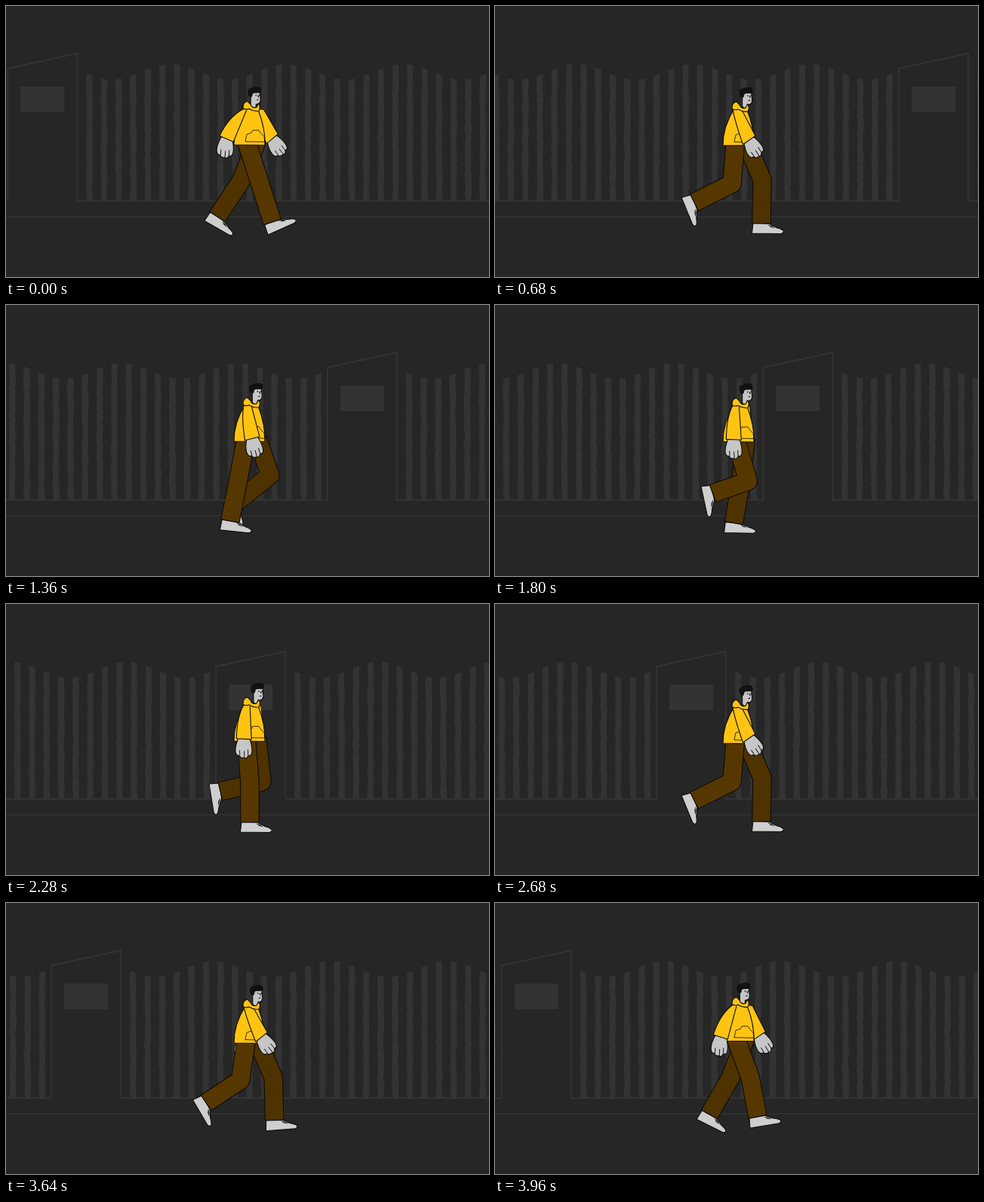
Animation, 640 px wide and 360 px high, one loop 4 s. Source, as an HTML page with a canvas:

```html
<!DOCTYPE html>
<html lang="en">
<head>
<meta charset="utf-8">
<title>Night walk</title>
<style>
  html, body { margin: 0; width: 100%; height: 100%; overflow: hidden; background: #262626; }
  canvas { display: block; }
</style>
</head>
<body>
<canvas id="stage" width="640" height="360"></canvas>
<script>
const ctx = document.getElementById('stage').getContext('2d');
const LOOP = 4000, STEP = 40, STRIDE = 1000;
const TILE = 641.6, SPACING = 19.3, BARS = 28;
const INK = '#0c0c0c', SKIN = '#c6c6c6', SHOE = '#cecece', HOODIE = '#ffc412', FENCE = '#333333';
const NEAR_PANTS = '#573700', FAR_PANTS = '#4e3200';
const FAR_OFFSET = 14;
const RAD = Math.PI / 180;

// phase, knee x, knee y, cuff x, cuff y, foot angle
const LEG = [
  [0, 337, 237, 353, 287, -25],
  [180, 347, 231, 353, 289, 0],
  [280, 323, 238, 323, 290, 0],
  [360, 307, 236, 297, 287, 5],
  [460, 305, 232, 284, 281, 26],
  [500, 304, 233, 280, 280, 29],
  [680, 314, 236, 264, 261, 67],
  [780, 332, 236, 284, 249, 80],
  [860, 343, 226, 305, 262, 55],
  [960, 338, 231, 348, 284, -10]
];
// phase, arm angle
const ARM = [[0, 36], [180, 20], [280, 5], [360, -10], [460, -24], [500, -28], [680, -25], [780, 0], [960, 27]];

const SHAPES = {
  foot: 'M-11 -1 L-12.5 13 L26 13.5 Q31 12 28.5 9 Q26 7 20 5.5 L10 0 Z',
  laces: 'M11 4 L17 5.5 M9 2 L15 4',
  hand: 'M-7 -2 Q-12 10 -11 17 Q-10 23 -6 22 Q-4 26 0 25 Q4 27 6 22 Q11 23 11 16 Q11 8 7 -2 Z',
  fingers: 'M-5 22 L-5.5 15 M1 25 L0.5 16 M6 22 L5.5 14',
  torso: 'M317 134 Q302 158 302 183 L343 183.5 Q344 162 334 136 Z',
  pocket: 'M317 178.5 L319 169 L325 167 L327 163.5 L335 163.5 L338 168 L342 172 L343 179 Z',
  hood: 'M314 134 Q314 126 320 125 L324 129 Q326 135 332 133 L334.5 128 Q338 133 335 138 Q328 139 322 135 Q317 137 314 134 Z',
  face: 'M324 116 L324 132 Q327 137 331 134 L331 130 Q337 130 337 124 L336 112 Z',
  hair: 'M322 120 Q318 110 324 109 Q329 106 336 107.5 Q339 111 337 114.5 Q331 115 327 114.5 L325.5 120 Z',
  features: 'M331 117 L331 119 M335.5 117 L335.5 119 M333.5 118 L334.5 121 M332 124.5 L334.5 124'
};
for (const name in SHAPES) SHAPES[name] = new Path2D(SHAPES[name]);

// Smooth periodic curve through the keys, one value per column
function sample(keys, phase) {
  const n = keys.length;
  const key = i => keys[(i + n) % n];
  const time = i => key(i)[0] + STRIDE * Math.floor(i / n);
  let i = n - 1;
  while (keys[i][0] > phase) i--;
  const span = time(i + 1) - time(i), u = (phase - time(i)) / span;
  return key(i).slice(1).map((_, c) => {
    const value = j => key(j)[c + 1];
    const slope = j => (value(j + 1) - value(j - 1)) / (time(j + 1) - time(j - 1)) * span;
    const a = value(i), b = value(i + 1), u2 = u * u, u3 = u2 * u;
    return a + (b - a) * (3 * u2 - 2 * u3) + slope(i) * (u3 - 2 * u2 + u) + slope(i + 1) * (u3 - u2);
  });
}

function paint(path, fill, line = 1.1) {
  if (fill) { ctx.fillStyle = fill; ctx.fill(path); }
  if (line) { ctx.strokeStyle = INK; ctx.lineWidth = line; ctx.stroke(path); }
}

function at(x, y, angle, draw) {
  ctx.save();
  ctx.translate(x, y);
  ctx.rotate(angle * RAD);
  draw();
  ctx.restore();
}

function makeFence() {
  let seed = 7;
  const rough = () => ((seed = seed * 16807 % 2147483647) / 2147483647 - 0.5) * 1.6;
  const top = x => 87.5 + 10.5 * Math.cos((x - 46) * 2 * Math.PI / (8 * SPACING));
  const path = new Path2D();
  for (let i = 0; i < BARS; i++) {
    const x = 16.3 + i * SPACING;
    path.moveTo(x - 4, top(x - 4));
    path.lineTo(x + 4, top(x + 4));
    for (let y = 102; y <= 258; y += 4) path.lineTo(x + 4 + rough(), y);
    for (let y = 258; y >= 102; y -= 4) path.lineTo(x - 4 + rough(), y);
    path.closePath();
  }
  path.rect(-75, 107, 58, 34);
  return path;
}
const fence = makeFence();
const outline = new Path2D(`M-92 259 V83 L0 63 V259 H${TILE - 92}`);

function drawStreet(t) {
  ctx.fillStyle = '#262626';
  ctx.fillRect(0, 0, 640, 360);
  ctx.fillStyle = ctx.strokeStyle = FENCE;
  ctx.lineWidth = 1.8;
  const x = 94.4 - TILE * t / LOOP;
  for (const shift of [0, TILE]) {
    at(x + shift, 0, 0, () => { ctx.fill(fence); ctx.stroke(outline); });
  }
  ctx.fillRect(0, 279.2, 640, 1.6);
}

function drawLeg(phase, offset, bob, color) {
  const [kneeX, kneeY, cuffX, cuffY, footAngle] = sample(LEG, phase);
  at(cuffX, cuffY, footAngle, () => {
    paint(SHAPES.foot, SHOE);
    paint(SHAPES.laces, null, 0.9);
  });
  const leg = new Path2D();
  leg.moveTo(318.5 + offset, 178 + bob);
  leg.lineTo(kneeX + offset / 2, kneeY);
  leg.lineTo(cuffX, cuffY);
  for (const [style, width] of [[INK, 25.6], [color, 23.4]]) {
    ctx.strokeStyle = style;
    ctx.lineWidth = width;
    ctx.stroke(leg);
  }
  const shin = Math.atan2(cuffY - kneeY, cuffX - kneeX - offset / 2) / RAD - 90;
  at(cuffX, cuffY, shin, () => {
    ctx.fillStyle = INK;
    ctx.fillRect(-12.8, -0.6, 25.6, 1.2);
  });
}

function drawArm(phase, offset, bob) {
  const [angle] = sample(ARM, phase);
  const x = 319 + offset, y = 138 + bob;
  const length = 42 + Math.max(0, angle) * 0.1;
  const cuffX = x - length * Math.sin(angle * RAD), cuffY = y + length * Math.cos(angle * RAD);
  const tilt = angle * (angle < 0 ? 1.4 : 0.65) * RAD;
  const dx = 10 * Math.cos(tilt), dy = 10 * Math.sin(tilt);
  at(cuffX, cuffY, angle * (angle < 0 ? 1.2 : 0.2), () => {
    paint(SHAPES.hand, SKIN);
    paint(SHAPES.fingers, null, 0.9);
  });
  const left = cuffX - dx, leftY = cuffY - dy;
  const sleeve = new Path2D();
  sleeve.moveTo(x - 4, y - 3);
  sleeve.quadraticCurveTo((x - 4 + left) / 2 - 4, (y + leftY) / 2 - 9, left, leftY);
  sleeve.lineTo(cuffX + dx, cuffY + dy);
  sleeve.lineTo(x + 5 - angle * 0.15, y - 1);
  paint(sleeve, HOODIE);
}

function drawWalker(t) {
  const near = t % STRIDE, far = (near + STRIDE / 2) % STRIDE;
  const wave = lag => Math.cos((near - lag) * 4 * Math.PI / STRIDE);
  const bob = 0.7 + 2.7 * wave(100), sway = 2.2 - 2 * wave(-10);
  ctx.lineJoin = 'round';
  drawArm(far, FAR_OFFSET, bob);
  drawLeg(far, FAR_OFFSET, bob, FAR_PANTS);
  drawLeg(near, 0, bob, NEAR_PANTS);
  at(0, bob, 0, () => {
    paint(SHAPES.torso, HOODIE);
    paint(SHAPES.pocket, null, 0.8);
  });
  drawArm(near, 0, bob);
  at(sway, bob - 1, 0, () => {
    paint(SHAPES.face, SKIN);
    paint(SHAPES.hair, '#121212', 0.6);
    paint(SHAPES.features, null);
  });
  at(0, bob, 0, () => paint(SHAPES.hood, HOODIE));
}

function frame() {
  const t = Math.floor(performance.now() % LOOP / STEP) * STEP;
  drawStreet(t);
  drawWalker(t);
  requestAnimationFrame(frame);
}
frame();
</script>
</body>
</html>
```
